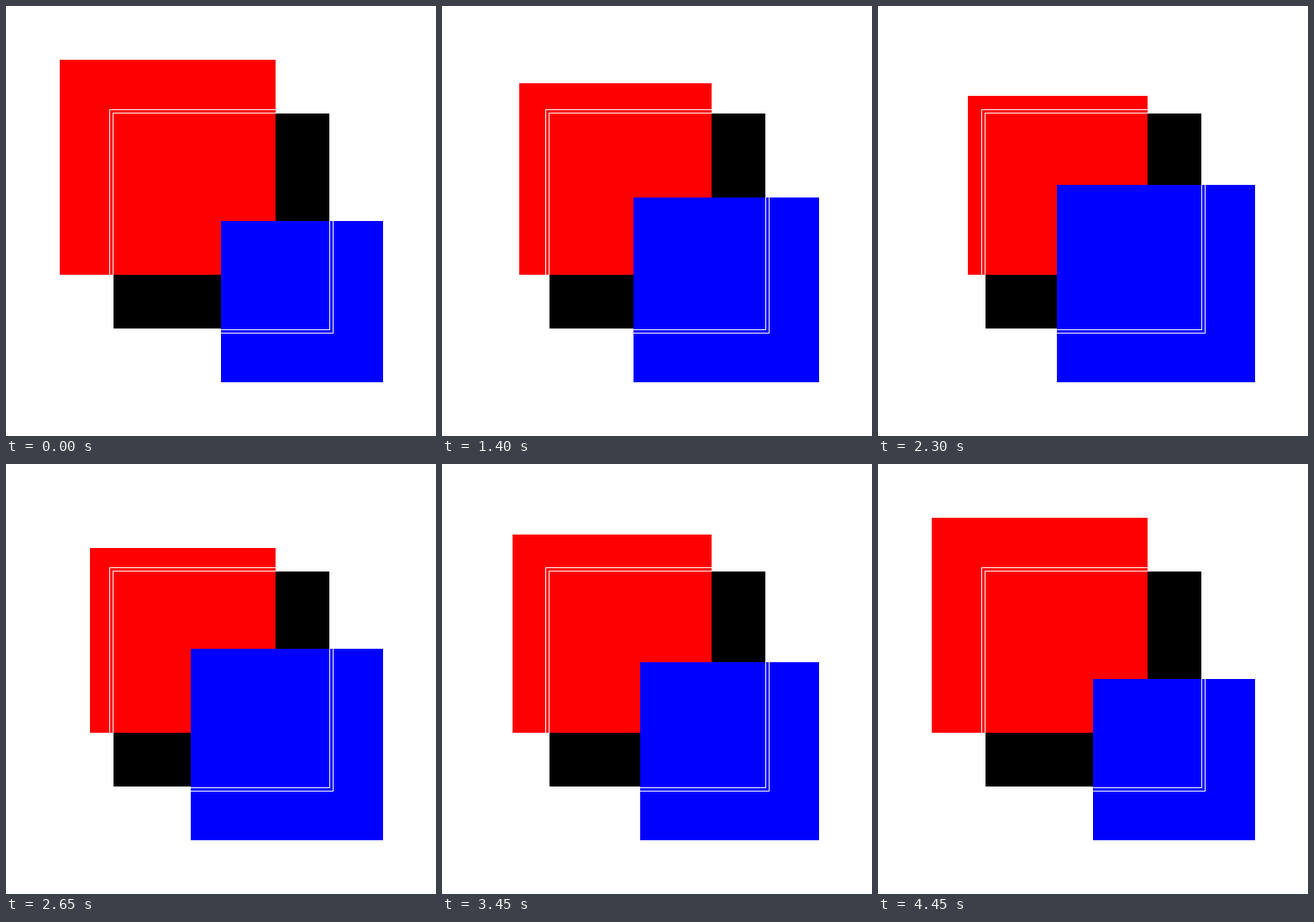
An HTML page with a canvas for the animation above (4.5 s loop, 512 by 512 pixels).

```html
<!DOCTYPE html>
<html>
<head>
<meta charset="utf-8">
<style>
html, body { margin: 0; width: 100%; height: 100%; overflow: hidden; background: #fff; }
canvas { display: block; }
</style>
</head>
<body>
<canvas width="512" height="512"></canvas>
<script>
const ctx = document.querySelector('canvas').getContext('2d');
const STEP = 50, STEPS = 90;

function box(color, start, end) {
  ctx.fillStyle = color;
  ctx.fillRect(start, start, end + 1 - start, end - start);
}

function outline(start, end) {
  ctx.strokeStyle = '#fff';
  ctx.strokeRect(start + 0.5, start + 0.5, end - start, end - start);
}

function draw(now) {
  const step = Math.floor(now / STEP) % STEPS;
  const shift = Math.min(step, STEPS - 1 - step); // one pixel per step, there and back
  ctx.fillStyle = '#fff';
  ctx.fillRect(0, 0, 512, 512);
  box('#000', 128, 384);
  box('#f00', 64 + shift, 320);
  box('#00f', 256 - shift, 448);
  outline(123, 389);
  outline(127, 385);
}

function loop() {
  draw(performance.now());
  requestAnimationFrame(loop);
}
loop();
</script>
</body>
</html>
```
